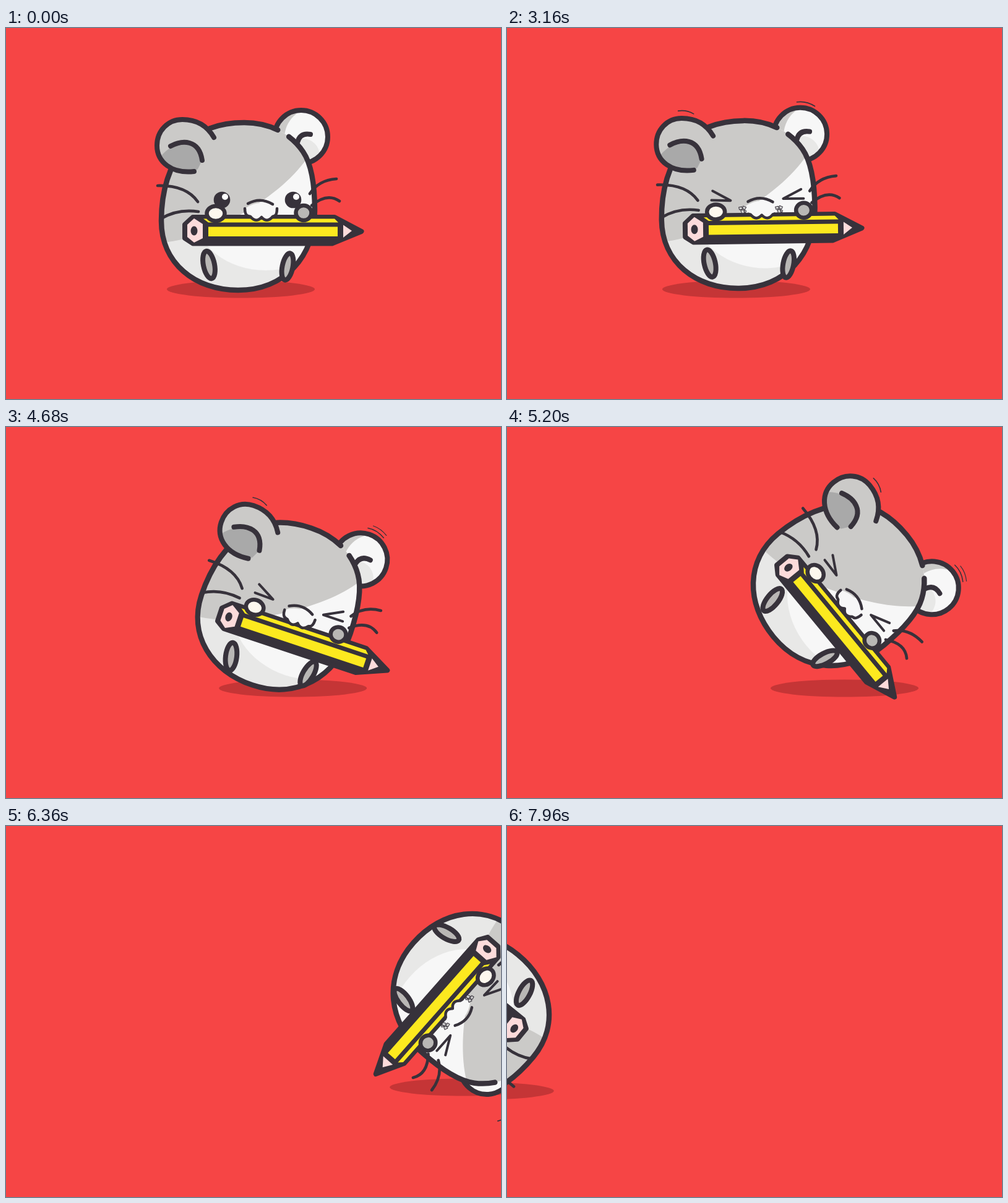
An HTML page with a canvas that plays this animation: 800x600 px, repeating every 8000 ms.

```html
<!DOCTYPE html>
<html lang="en">
<head>
<meta charset="utf-8">
<title>Rolling mouse</title>
<style>
html, body { margin: 0; width: 100%; height: 100%; overflow: hidden; background: #f64545; }
canvas { display: block; }
</style>
</head>
<body>
<canvas id="stage" width="800" height="600"></canvas>
<script>
const ctx = document.getElementById('stage').getContext('2d');
const LOOP = 8000, BITE = 2720, CHEW = 320;
const RED = '#f64545', SHADOW = '#c53536', INK = '#37323b', GRAY = '#cbcac8', DARK = '#a9a9a9',
  WHITE = '#f7f7f7', SHADE = '#e8e8e7', PAW = '#b9b7b5', CREAM = '#fdf8ee',
  YELLOW = '#fce91f', PINK = '#fcdbdb';

// Body centre in its resting drawing; every part uses those coordinates.
const CX = 374, CY = 288;

// time, x, y, angle, shadow x, foot swing
const ROLL_OUT = [
  [0, 374, 288, 0, 379.5, 0],
  [2560, 374, 288, 0, 379.5, 0],
  [3160, 372.5, 285, -0.7, 370.5, 0],
  [3320, 361, 286, -5, 362, 0],
  [3720, 347, 288, -13, 345, 0],
  [4160, 368, 288, -5, 368, 0],
  [4680, 440, 288, 18.4, 463.5, 8],
  [5720, 637.5, 288, 86.2, 626.5, 0],
  [6360, 761, 278, 131.4, 739.5, 11],
  [7600, 998, 285, 215, 959, 0]
];
const ROLL_IN = [
  [7600, -154.5, 314, 183, -130, 0],
  [7960, -68, 314, 219.3, -44, 0],
  [8000, -58.5, 314, 223, -34, 0]
];

const path = d => new Path2D(d);
const shapes = {
  body: path('M385 153C425 153 460 170 480 200C495 222 499 260 499 295C499 370 450 424 375 424C305 424 251 380 251 312C251 262 264 222 290 190C310 165 345 153 385 153Z'),
  belly: path('M305 140V300A115 92 0 0 0 535 300V140Z'),
  fur: path('M490 205C470 238 430 272 382 300C345 322 300 344 245 348H200V100H490Z'),
  earRight: path('M520 176A43 43 0 1 1 434 176A43 43 0 1 1 520 176Z'),
  earRightCurl: path('M471 185Q475 169 492 172'),
  earLeft: path('M336 177C325 158 308 148 285 148C262 148 244 166 244 190C244 217 268 236 304 232'),
  earLeftFill: path('M336 177C325 158 308 148 285 148C262 148 244 166 244 190C244 217 268 236 304 232Q335 215 336 177Z'),
  earLeftDark: path('M246 214C256 196 275 187 290 186C308 188 317 200 317 214L306 236H262Z'),
  earLeftCurl: path('M266 191C285 181 312 180 317 214'),
  whiskers: path('M245 255Q291 254 310 281M251 308Q278 292 311 297M491 268Q505 246 534 244M494 287Q519 266 539 280'),
  squint: path('M334 266L363 282L332 281M477 265L448 280L481 280'),
  brow: path('M391 284Q411 273 431 285'),
  muzzle: path('M386 292Q386 304 395 305Q404 316 413 306Q422 316 431 305Q438 304 438 292Q412 274 386 292Z'),
  lips: path('M391 304L395 305Q404 316 413 306Q422 316 431 305L434 304'),
  cheeks: path('M386 292Q386 302 391 304M438 292Q438 302 434 304'),
  crumbs: path('M-6 -4L-1 -5L0 -1L-5 0ZM1 -6L6 -4L4 0L0 -2ZM-3 1L2 0L3 5L-1 6ZM3 1L6 2L5 5L3 4Z'),
  pencil: path('M289 318L302 306H531L574.5 329L527 348.5H302L289 340Z'),
  pencilTop: path('M319 308.5H531L537 314.5H327Z'),
  pencilSide: path('M327 321.5H536V337H327Z'),
  eraser: path('M304 308L318 317V340L304 347L293 338V318Z'),
  wood: path('M545 318.5L559 328L545 339Z'),
  buzz: path('M280 136Q293 134 305 141M472 124Q487 122 501 131'),
  buzzExtra: path('M479 118Q492 118 504 126')
};

function paint(shape, fill, width, ink = INK) {
  if (fill) { ctx.fillStyle = fill; ctx.fill(shape); }
  if (width) { ctx.lineWidth = width; ctx.strokeStyle = ink; ctx.stroke(shape); }
}

function oval(x, y, rx, ry, fill, width = 0, tilt = 0) {
  const shape = new Path2D();
  shape.ellipse(x, y, rx, ry, tilt, 0, Math.PI * 2);
  paint(shape, fill, width);
}

function group(draw, x = 0, y = 0) {
  ctx.save();
  ctx.translate(x, y);
  draw();
  ctx.restore();
}

const easeInOut = u => u < 0.5 ? 4 * u ** 3 : 1 - (2 - 2 * u) ** 3 / 2;
const progress = (t, from, to) => easeInOut(Math.min(1, Math.max(0, (t - from) / (to - from))));

// Smooth curve through the keys that never overshoots a turning point.
function sample(keys, t, col) {
  let i = 0;
  while (i < keys.length - 2 && t >= keys[i + 1][0]) i++;
  const slope = n => (keys[n + 1][col] - keys[n][col]) / (keys[n + 1][0] - keys[n][0]);
  const tangent = n => {
    if (n === 0) return slope(0);
    if (n === keys.length - 1) return slope(n - 1);
    const a = slope(n - 1), b = slope(n);
    return a * b <= 0 ? 0 : 2 * a * b / (a + b);
  };
  const span = keys[i + 1][0] - keys[i][0], u = (t - keys[i][0]) / span;
  return (1 + 2 * u) * (1 - u) ** 2 * keys[i][col] + u * (1 - u) ** 2 * span * tangent(i)
    + u * u * (3 - 2 * u) * keys[i + 1][col] + u * u * (u - 1) * span * tangent(i + 1);
}

function poseAt(t) {
  const keys = t < 7600 ? ROLL_OUT : ROLL_IN;
  const [x, y, degrees, shadowX, swing] = [1, 2, 3, 4, 5].map(col => sample(keys, t, col));
  const angle = degrees * Math.PI / 180, sin = Math.sin(angle), cos = Math.cos(angle);
  const biting = t >= BITE;
  const chew = Math.cos((t - 280) / CHEW * Math.PI * 2);
  return {
    x, angle, sin, cos, shadowX, swing, biting,
    // The pencil tip lifts the body when it meets the ground.
    y: Math.min(y, 435.5 - 204 * sin - 41 * cos),
    shadowY: keys === ROLL_IN ? 428.5 : 422.5,
    look: progress(t, 560, 1320) - progress(t, 1680, 2300),
    bob: biting ? 3.5 * (1 - chew) : 0,
    crumbs: biting && chew > 0.3
  };
}

// Ears fold inwards instead of sinking below the ground.
function earPush(pose, x, y) {
  const groundY = pose.y + (x - CX) * pose.sin + (y - CY) * pose.cos;
  const rise = Math.max(0, groundY - 391);
  return [-rise * pose.sin, -rise * pose.cos];
}

function drawEarRight(pose) {
  const k = pose.look, [px, py] = earPush(pose, 477, 176);
  group(() => {
    group(() => {
      ctx.clip(shapes.earRight);
      paint(shapes.earRight, GRAY);
      oval(500, 178, 50, 50, WHITE);
      oval(480, 206, 27, 27, SHADE);
    });
    paint(shapes.earRight, null, 8);
    group(() => paint(shapes.earRightCurl, null, 8), -k, 4 * k);
  }, px - 2 * k, py + 5 * k);
}

function drawEarLeft(pose) {
  const k = pose.look, [px, py] = earPush(pose, 285, 190);
  group(() => {
    ctx.rotate(21 * k * Math.PI / 180);
    ctx.translate(-285, -190);
    paint(shapes.earLeftFill, GRAY);
    group(() => {
      ctx.clip(shapes.earLeftFill);
      paint(shapes.earLeftDark, DARK);
    });
    paint(shapes.earLeft, null, 8);
    paint(shapes.earLeftCurl, null, 8);
  }, 285 + px - 11 * k, 190 + py - 18 * k);
}

function drawBody(k) {
  group(() => {
    ctx.scale(1 - 0.022 * k, 1);
    ctx.translate(-499, 0);
    group(() => {
      ctx.clip(shapes.body);
      paint(shapes.body, SHADE);
      group(() => paint(shapes.belly, WHITE), -8 * k);
      group(() => paint(shapes.fur, GRAY), -3 * k, -5 * k);
    });
    ctx.setLineDash([56, 21 + 50 * k, 3000]);
    paint(shapes.body, null, 8.5);
    ctx.setLineDash([]);
  }, 499);
}

function drawPencil() {
  paint(shapes.pencil, INK, 8);
  paint(shapes.pencilTop, YELLOW);
  paint(shapes.pencilSide, YELLOW);
  paint(shapes.eraser, PINK);
  oval(304, 328, 5.5, 7.5, INK);
  paint(shapes.wood, PINK);
}

function drawEyes(biting) {
  if (biting) return paint(shapes.squint, null, 4);
  for (const x of [349, 464]) {
    oval(x, 278, 13.3, 13.3, INK);
    oval(x + 5, 273, 5, 5, '#fff');
  }
}

function drawFace(pose) {
  drawEyes(pose.biting);
  group(drawPencil, 0, pose.bob);
  paint(shapes.muzzle, WHITE);
  paint(shapes.lips, null, 4.5);
  paint(shapes.brow, null, 4.5);
  if (pose.crumbs) {
    for (const x of [382, 441]) group(() => paint(shapes.crumbs, '#d0d0d0', 1), x, 297);
  } else {
    paint(shapes.cheeks, null, 4.5);
  }
  group(() => {
    oval(339, 300, 14.5, 12, CREAM, 6.5);
    oval(481, 299, 12.5, 12, PAW, 6.5);
  }, 0, pose.bob);
}

function drawMouse(pose) {
  const k = pose.look;
  drawEarRight(pose);
  drawBody(k);
  drawEarLeft(pose);
  group(() => paint(shapes.whiskers, null, 4.7), -28.5 * k);
  group(() => {
    oval(328, 383 + pose.swing, 9, 22.5, PAW, 8, -0.2);
    oval(455, 386 - pose.swing, 8.5, 22, PAW, 8, 0.2);
  }, -28.5 * k, -1.5 * k);
  group(() => drawFace(pose), -38 * k);
  if (pose.biting) {
    paint(shapes.buzz, null, 1.6);
    if (!pose.crumbs) paint(shapes.buzzExtra, null, 1.2);
  }
}

function frame(now) {
  const pose = poseAt(now % LOOP);
  ctx.fillStyle = RED;
  ctx.fillRect(0, 0, 800, 600);
  ctx.lineCap = ctx.lineJoin = 'round';
  oval(pose.shadowX, pose.shadowY, 119.5, 14, SHADOW);
  group(() => {
    ctx.rotate(pose.angle);
    ctx.translate(-CX, -CY);
    drawMouse(pose);
  }, pose.x, pose.y);
  requestAnimationFrame(() => frame(performance.now() - start));
}

const start = performance.now();
frame(0);
</script>
</body>
</html>
```
